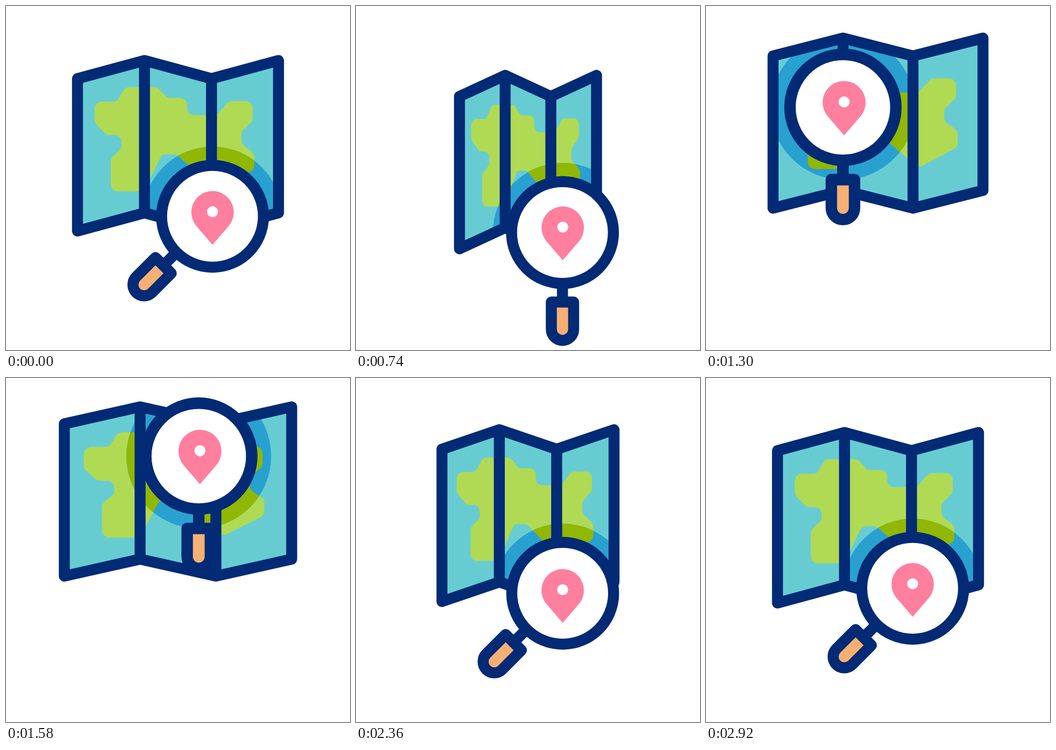
Write an HTML page with a canvas that moves like this. It is 640x640 px and loops after 3120 ms.

```html
<!DOCTYPE html>
<html lang="en">
<head>
<meta charset="utf-8">
<title>Map search</title>
<style>
html, body { margin: 0; width: 100%; height: 100%; overflow: hidden; background: #fff; }
canvas { display: block; width: 100vw; height: 100vh; }
</style>
</head>
<body>
<canvas id="stage" width="640" height="640"></canvas>
<script>
const ctx = document.getElementById('stage').getContext('2d');
const LOOP = 3120;
const REST_W = 124.67;
const HALF_H = 141.7;
const NAVY = '#022a75', SEA = '#67ccd2', LAND = '#b0da54';
const DEEP_SEA = '#29a1d0', DEEP_LAND = '#90b704';
const PINK = '#ff7f9f', ORANGE = '#f6b073';

// Beats of the loop, as start and end in ms.
const CROUCH = [200, 640], LEAP = [720, 1160], SWEEP = [1160, 1860];
const DROP = [1870, 2240], BOUNCE = [2240, 2520], SETTLE = [2520, 2920];
const delay = ([a, b], late, lateEnd = 0) => [a + late, b + lateEnd];

const ease = p => p < 0.5 ? 4 * p ** 3 : 1 - 4 * (1 - p) ** 3;

// Starts at a value and eases to a new one during each beat.
const moves = (rest, ...steps) => t => steps.reduce((v, [[a, b], to]) => {
  const p = Math.min(1, Math.max(0, (t - a) / (b - a)));
  return v + (to - v) * ease(p);
}, rest);

const panelW = moves(REST_W, [CROUCH, 85], [delay(LEAP, 110, 140), 130.2],
  [delay(SWEEP, 140), 151.6], [delay(DROP, 50), 90.5], [BOUNCE, 140.7], [SETTLE, REST_W]);
const mapY = moves(260, [CROUCH, 290.4], [LEAP, 218.3], [SWEEP, 208.7],
  [delay(DROP, 50), 267], [BOUNCE, 233], [SETTLE, 260]);
const lensX = moves(384.2, [LEAP, 250], [SWEEP, 395.5], [DROP, 384.5]);
const lensY = moves(391.2, [CROUCH, 421.5], [LEAP, 190.5], [SWEEP, 130],
  [DROP, 413.5], [BOUNCE, 373], [SETTLE, 391.2]);
const lensTurn = moves(45, [delay(CROUCH, 124, 60), 0], [DROP, 45]);
const lensScale = moves(1, [delay(LEAP, 260, 140), 1.04], [delay(DROP, 70), 1]);
const pinX = moves(0, [CROUCH, 0.5], [LEAP, 2.2], [DROP, 0]);
const pinY = moves(-7.5, [CROUCH, -9], [DROP, -4.5], [BOUNCE, -7.5]);

// Corners of the land at rest size, all rounded alike.
const COAST_R = 13;
const COAST = [
  [165, 178], [206, 178], [222, 151], [282, 151], [300, 171], [337, 171], [337, 203],
  [392, 203], [415, 177], [459, 177], [459, 213], [438, 234], [438, 256], [462, 275],
  [462, 304], [392, 343], [317, 276], [290, 276], [262, 334], [250, 345], [195, 345],
  [195, 283], [215, 265], [215, 240], [187, 240], [165, 217]
];

function disc(x, y, r, color) {
  ctx.beginPath();
  ctx.arc(x, y, r, 0, 2 * Math.PI);
  ctx.fillStyle = color;
  ctx.fill();
}

function drawLand(w, cy, color) {
  ctx.save();
  ctx.translate(320, cy);
  ctx.scale(w / REST_W, 1 + (w - REST_W) * 0.0006);
  ctx.translate(-320, -260);
  ctx.beginPath();
  ctx.moveTo(165, 198);
  COAST.forEach(([x, y], i) => {
    const [nx, ny] = COAST[(i + 1) % COAST.length];
    ctx.arcTo(x, y, nx, ny, COAST_R);
  });
  ctx.closePath();
  ctx.fillStyle = color;
  ctx.fill();
  ctx.restore();
}

function drawMap(w, cy, lens) {
  const fold = (30.2 + (151 - w) * 0.138) / 2;
  const tops = [0, 1, 2, 3].map(i => [320 + (i - 1.5) * w, cy - HALF_H + (i % 2 ? -fold : fold)]);
  const sheet = new Path2D();
  tops.forEach(([x, y]) => sheet.lineTo(x, y));
  [...tops].reverse().forEach(([x, y]) => sheet.lineTo(x, y + 2 * HALF_H));
  sheet.closePath();

  ctx.save();
  ctx.clip(sheet);
  ctx.fillStyle = SEA;
  ctx.fill(sheet);
  drawLand(w, cy, LAND);
  disc(lens.x, lens.y, 129.5 * lens.scale, DEEP_SEA);
  ctx.clip();
  drawLand(w, cy, DEEP_LAND);
  ctx.restore();

  for (const [x, y] of tops.slice(1, 3)) {
    sheet.moveTo(x, y);
    sheet.lineTo(x, y + 2 * HALF_H);
  }
  ctx.lineWidth = 20.4;
  ctx.stroke(sheet);
}

function drawLens(lens) {
  ctx.save();
  ctx.translate(lens.x, lens.y);
  ctx.scale(lens.scale, lens.scale);
  ctx.rotate(lens.turn * Math.PI / 180);
  ctx.lineWidth = 20.5;

  ctx.beginPath();
  ctx.moveTo(0, 95);
  ctx.lineTo(0, 129);
  ctx.stroke();

  ctx.beginPath();
  ctx.moveTo(-20.75, 129.3);
  ctx.lineTo(20.75, 129.3);
  ctx.arc(0, 180, 20.75, 0, Math.PI);
  ctx.closePath();
  ctx.fillStyle = ORANGE;
  ctx.fill();
  ctx.stroke();

  disc(0, 0, 94.75, '#fff');
  ctx.stroke();
  ctx.restore();
}

function drawPin(x, y, scale) {
  const r = 39.5, tip = 60.5, a = Math.asin(r / tip);
  ctx.save();
  ctx.translate(x, y);
  ctx.scale(scale, scale);
  ctx.beginPath();
  ctx.arc(0, 0, r, Math.PI - a, a);
  ctx.lineTo(0, tip);
  ctx.closePath();
  ctx.fillStyle = PINK;
  ctx.fill();
  disc(0, -1, 10.2, '#fff');
  ctx.restore();
}

function draw(t) {
  const lens = { x: lensX(t), y: lensY(t), turn: lensTurn(t), scale: lensScale(t) };
  ctx.fillStyle = '#fff';
  ctx.fillRect(0, 0, 640, 640);
  ctx.strokeStyle = NAVY;
  ctx.lineJoin = 'round';
  drawMap(panelW(t), mapY(t), lens);
  drawLens(lens);
  drawPin(lens.x + pinX(t), lens.y + pinY(t), 1 + (lens.scale - 1) * 0.3);
}

const start = performance.now();
function tick() {
  draw((performance.now() - start) % LOOP);
  requestAnimationFrame(tick);
}
tick();
</script>
</body>
</html>
```
